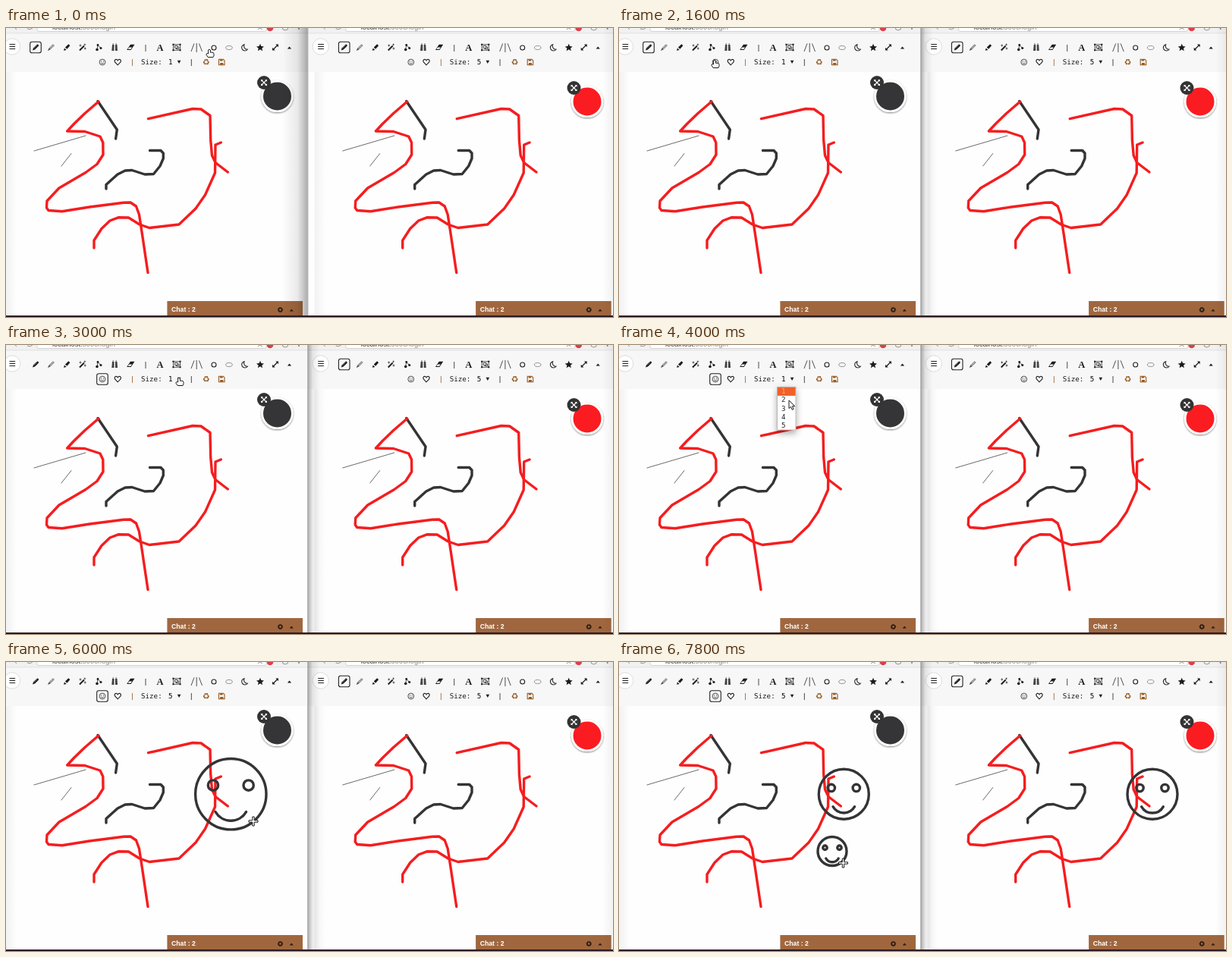
An HTML page that plays this animation: 800x381 px, repeating every 8 s.

```html
<!DOCTYPE html>
<html lang="en">
<head>
<meta charset="utf-8">
<title>Shared drawing board</title>
<style>
html, body { margin: 0; width: 100%; height: 100%; overflow: hidden; background: #fefefe; }
svg { display: block; width: 800px; height: 381px; }
.line { fill: none; stroke-width: 3.4; stroke-linecap: round; stroke-linejoin: round; }
.red { stroke: #f51d1f; }
.dark { stroke: #343436; }
.thin { stroke: #444; stroke-width: .8; }
.o { fill: none; stroke: #222; stroke-width: 1.1; }
.o.fine { stroke-width: .8; }
.o.gray { stroke: #888; stroke-width: .9; }
.o.rust { stroke: #95591d; }
.mono { font: 9.2px "DejaVu Sans Mono", monospace; }
.url { font: 9.4px "Liberation Sans", sans-serif; }
.chat { font: bold 8.7px "Liberation Sans", sans-serif; fill: #fff; }
.brown { fill: #95591d; }
.box { fill: none; stroke: #222; stroke-width: 1.1; }
.hide { display: none; }
</style>
</head>
<body>
<svg viewBox="0 0 800 381" xmlns="http://www.w3.org/2000/svg">
<defs>
  <clipPath id="clipL"><path d="M0 0H397.5V381H0Z"/></clipPath>
  <clipPath id="clipR"><path d="M397.5 0H800V381H397.5Z"/></clipPath>
  <linearGradient id="fade">
    <stop offset="0" stop-opacity="0"/>
    <stop offset=".6" stop-opacity=".08"/>
    <stop offset="1" stop-opacity=".32"/>
  </linearGradient>
  <linearGradient id="edge"><stop offset="0" stop-opacity=".05"/><stop offset="1" stop-opacity="0"/></linearGradient>
  <filter id="soft" x="-50%" y="-50%" width="200%" height="200%">
    <feDropShadow dx="0" dy="1" stdDeviation="1.3" flood-opacity=".5"/>
  </filter>
  <filter id="drop" x="-60%" y="-30%" width="220%" height="170%">
    <feDropShadow dx="0" dy="4" stdDeviation="4" flood-opacity=".35"/>
  </filter>

  <g id="expand">
    <path d="M-3 3L3-3" stroke="currentColor" stroke-width="1.2"/>
    <path d="M4-4V-.3L.3-4ZM-4 4V.3L-.3 4Z" fill="currentColor"/>
  </g>
  <path id="caret" d="M-2.6 1.4L0-1.5L2.6 1.4Z"/>

  <g id="window">
    <path d="M-10 0H410V381H-10Z" fill="#fefefe"/>
    <path d="M-10 7H410V58H-10Z" fill="#f7f7f8"/>
    <path d="M-10 0H410V7H-10Z" fill="#f1f1f1"/>
    <path d="M-10 6.8H410" stroke="#dedede" stroke-width=".8"/>
    <rect x="41" y="-14" width="302" height="18.5" rx="2" fill="#fff" stroke="#c9c9c9" stroke-width=".8"/>
    <text class="url" x="61" y="2.4" fill="#333">localhost:<tspan fill="#888">3000/login</tspan></text>
    <path d="M12 0L14 2M28 1Q32 3 35 0M332 2L335 0L338 2" class="o gray"/>
    <circle cx="348" cy="0" r="4.3" fill="#d9404a"/>
    <circle cx="368" cy="-1" r="4" class="o gray"/>
    <circle cx="386" cy="1" r="1" fill="#777"/>

    <circle cx="8" cy="24.5" r="10.7" fill="#fff" stroke="#d8d8d8" stroke-width=".9"/>
    <path d="M4.5 21.5H12.2M4.5 24.5H12.2M4.5 27.5H12.2" stroke="#222" stroke-width="1.2"/>

    <g fill="#1c1c1c">
      <g transform="translate(39 25.5)">
        <path d="M-3.9 3.9L-3.1 1L1.6-3.6Q2.6-4.4 3.6-3.4Q4.5-2.5 3.7-1.6L-1 3.1Z"/>
        <path d="M-2.4 1.5L2-2.8" stroke="#aaa" stroke-width=".6"/>
      </g>
      <g transform="translate(59.5 25.5)">
        <path d="M-4 4L-2.5 1L2.4-3.8L4-2.4L-1 2.5Z" fill="#aaa" stroke="#666" stroke-width=".7"/>
        <path d="M-4 4L-2.5 1L-1 2.5Z" fill="#444"/>
      </g>
      <g transform="translate(80 25.5)">
        <path d="M-4 4.2L-3 1L-.3 3.4ZM-2 0L2.4-4.2L4.4-2.2L.4 2.3Z"/>
      </g>
      <g transform="translate(101 25.5)">
        <path d="M-4 4L2-2" stroke="#1c1c1c" stroke-width="1.9"/>
        <path d="M-3-4V-1M-4.5-2.5H-1.5M3.2 0V3M1.8 1.5H4.7M2.8-4.8V-2.4M1.6-3.6H4.2" stroke="#1c1c1c" stroke-width=".7"/>
      </g>
      <g transform="translate(122 25.5)">
        <path d="M-2 3L-1-3L3 1" class="o fine"/>
        <circle cx="-2" cy="3" r="1.8"/><circle cx="-1" cy="-3" r="1.4"/><circle cx="3" cy="1" r="1.5"/>
      </g>
      <path d="M140 22H142.5V30H139.3ZM144 22H146.5L147 30H144ZM140.5 20.5H142V21.5H140.5ZM144.5 20.5H146V21.5H144.5Z" opacity=".82"/>
      <path d="M159.2 29L164 21.8H169.5L164.7 29Z"/>
      <path d="M160.7 28L162.3 25.5H166L164.3 28Z" fill="#fff"/>
      <text x="181.3" y="29" class="mono">|</text>
      <text x="203" y="30" text-anchor="middle" style="font:bold 12.5px 'Liberation Serif',serif">A</text>
      <g transform="translate(225 25.5)">
        <path d="M-4.5-3.7H4.5V3.7H-4.5ZM-2.5-2H1V1H-2.5ZM1-.5H2.8V2.2H-.5V1" class="o fine"/>
        <path d="M-5.6-4.8h2.1v2.1H-5.6ZM3.5-4.8h2.1v2.1H3.5ZM-5.6 2.7h2.1v2.1H-5.6ZM3.5 2.7h2.1v2.1H3.5Z"/>
      </g>
      <path d="M244 31L248 20.5M251.2 20V32M254.5 20.5L258.5 31" class="o fine"/>
      <circle cx="274" cy="26" r="3" class="o"/>
      <ellipse cx="294" cy="26" rx="4.3" ry="2.5" class="o gray"/>
      <path d="M314 21.7A4.2 4.2 0 1 0 318.3 28.2A4.5 4.5 0 0 1 314 21.7Z" class="o"/>
      <path d="M335 20.8L336.4 24.1L340 24.4L337.3 26.7L338.1 30.2L335 28.3L331.9 30.2L332.7 26.7L330 24.4L333.6 24.1Z"/>
      <use href="#expand" x="355" y="25.5" color="#1c1c1c"/>
      <use href="#caret" x="373.5" y="26"/>

      <g transform="translate(127 45)">
        <circle r="3.9" class="o fine"/>
        <path d="M-2 .9Q0 3.4 2 .9" class="o fine"/>
        <circle cx="-1.4" cy="-1.2" r=".6"/><circle cx="1.4" cy="-1.2" r=".6"/>
      </g>
      <path d="M147.3 48.8L143.6 45Q142.5 42.5 144.3 41.5Q146.2 40.8 147.3 42.8Q148.4 40.8 150.3 41.5Q152.1 42.5 151 45Z" class="o"/>
      <text x="163.8" y="48.4" class="mono brown">|</text>
      <text x="178" y="48.4" class="mono">Size:</text>
      <path d="M225.8 42.8H230.4L228.1 47Z"/>
      <text x="241.6" y="48.4" class="mono">|</text>
    </g>
    <text x="264" y="48.7" text-anchor="middle" class="brown" style="font:11px 'DejaVu Sans',sans-serif">♻</text>
    <path d="M280.5 41.3H286.4L288 42.9V48.7H280.5Z" class="o rust"/>
    <path d="M282 41.3H285.6V43.6H282ZM282.2 46H286.3V48.7H282.2Z" class="brown"/>

    <path d="M0 58H14V381H0Z" fill="url(#edge)"/>
    <path class="line thin" d="M37 162L105 142M73 182L86 165.5"/>
    <path class="line dark" d="M121 96.5L146.3 134L144.6 146M189.5 161.5H204L207.3 165V172L203 182L194.5 192.5L183 193L166 187.5L157 188L147 193L132 206.5V212"/>
    <path class="line red" d="M122 97L104 112.5L89.5 126.5L80.7 136L104 136.5L124 143L127.8 151L128 167L120 179.5L105 190.5L70 211L54 228L53.5 237L56 240.5L74 241.7L110 236L155 230.2L164 230L171.5 235L175.5 246L179.5 272L183.5 299L187 322.5"/>
    <path class="line red" d="M187.5 119.7L246 106.5L257 107L269 115.5L269.7 148L271.5 168L276 177.5L292.3 190"/>
    <path class="line red" d="M283.3 151L276 154L275.5 191L262.5 220L250 238L228 259L189 263.5L176 259L161.5 250L148 249.8L137 254L126 264.5L116 280V290"/>

    <path d="M212.4 360H391V379H212.4Z" fill="#a0673f"/>
    <text x="218" y="374.2" class="chat">Chat : 2</text>
    <circle cx="361.5" cy="371.5" r="2.2" fill="none" stroke="#2b1c12" stroke-width="1.6"/>
    <circle cx="361.5" cy="371.5" r="3.2" fill="none" stroke="#2b1c12" stroke-dasharray="1.25 1.25"/>
    <use href="#caret" x="376.3" y="372" fill="#2b1c12"/>
  </g>
  <g id="picker">
    <circle cx="357.5" cy="90" r="19.8" fill="currentColor" stroke="#fff" stroke-width="2.6" filter="url(#soft)"/>
    <circle cx="340" cy="72" r="9" fill="#333"/>
    <g transform="translate(340 72)" stroke="#fff" fill="#fff">
      <path d="M-3-3L3 3M3-3L-3 3" stroke-width="1.1"/>
      <path d="M-4-4H-1.2L-4-1.2ZM4-4H1.2L4-1.2ZM-4 4H-1.2L-4 1.2ZM4 4H1.2L4 1.2Z" stroke="none"/>
    </g>
  </g>
  <rect id="frame" x="-7.3" y="-7.3" width="14.6" height="14.6" rx="2.6" class="box"/>
</defs>

<g clip-path="url(#clipR)">
  <g transform="translate(406.7)">
    <use href="#window"/>
    <use href="#frame" x="39" y="25.5"/>
    <text x="214" y="48.4" class="mono">5</text>
    <use href="#picker" x="1.8" y="7" color="#fb1f20"/>
  </g>
  <path d="M0 0H14V381H0Z" fill="url(#edge)" transform="matrix(-1 0 0 1 800 0)"/>
  <g id="copy" class="hide line dark"></g>
  <path id="shadeR" d="M0 0H16V381H0Z" fill="url(#fade)" transform="matrix(-1 0 0 1 413.5 0)"/>
</g>

<g clip-path="url(#clipL)">
  <use href="#window"/>
  <use id="tool" href="#frame"/>
  <text id="size" x="214" y="48.4" class="mono">1</text>
  <use href="#picker" color="#363638"/>
  <path id="shadeL" d="M364 0H397.5V381H364Z" fill="url(#fade)"/>
</g>
<path d="M397.8 0V381" stroke="#999"/>
<path d="M0 379H800V381H0Z" fill="#2c1b25"/>

<g id="face1" class="line dark"></g>
<g id="face2" class="line dark"></g>

<g id="menu" filter="url(#drop)">
  <path d="M208.5 55.3H233V112H208.5Z" fill="#fff" stroke="#b0a8a0" stroke-width=".8"/>
  <rect id="pick" x="208.9" width="23.7" height="11.2" fill="#f0602c"/>
  <g id="items" class="mono"></g>
</g>

<g id="cursor" fill="#fff" stroke="#1a1a1a" stroke-linejoin="round">
  <path id="hand" d="M-1.4 6V1Q0-.8 1.4 1V4.2H4Q6 4.4 6 6.3V8.2L5 10.5H-1.8L-4 7.3Q-4.2 5.6-2.8 5.6Z"/>
  <path id="arrow" d="M0 0V10.6L2.5 8.4L4.3 12.4L6.2 11.5L4.4 7.7H7.8Z"/>
  <path id="cross" d="M-1.2-6H1.2V-1.2H6V1.2H1.2V6H-1.2V1.2H-6V-1.2H-1.2Z"/>
</g>
</svg>
<script>
const $ = id => document.getElementById(id);
const LOOP = 8000, STEP = 200;

// step: cursor kind, x, y
const moves = {
  0: ['hand', 268, 28], 1: ['hand', 288, 28], 2: ['hand', 314, 28],
  3: ['hand', 302, 32], 4: ['hand', 264, 36], 5: ['hand', 212, 38],
  6: ['hand', 165, 39], 7: ['hand', 138, 41], 8: ['hand', 126, 42],
  10: ['hand', 150, 42], 11: ['hand', 204, 42], 12: ['hand', 246, 42.5],
  13: ['hand', 240, 43], 14: ['hand', 233, 43], 15: ['hand', 228, 43],
  18: ['arrow', 228, 46], 19: ['arrow', 226, 58], 20: ['arrow', 224, 73],
  21: ['arrow', 221, 103], 23: ['cross', 222, 106], 24: ['cross', 237, 122],
  25: ['cross', 268, 150], 26: ['cross', 291, 169], 27: ['cross', 296.5, 173],
  28: ['cross', 312, 194], 29: ['cross', 321, 204], 30: ['cross', 326, 210],
  32: ['cross', 321, 205], 33: ['cross', 316, 200], 35: ['cross', 307, 218],
  36: ['cross', 290, 243], 37: ['cross', 281, 249], 38: ['cross', 289, 257],
  39: ['cross', 295.5, 265]
};
// step: radius
const radius1 = { 0: 0, 28: 25.5, 29: 39, 30: 46.7, 32: 40, 33: 33 };
const radius2 = { 0: 0, 38: 11, 39: 19 };

function at(table, step) {
  while (!(step in table)) step--;
  return table[step];
}

function face(x, y, r) {
  if (!r) return '';
  const ring = (dx, dy, q) => `<circle cx="${x + dx}" cy="${y + dy}" r="${q}"/>`;
  const mx = r / 2 * Math.cos(Math.PI / 6), my = y + r / 2;
  return ring(0, 0, r) + ring(-r / 2, -r / 4, r / 7) + ring(r / 2, -r / 4, r / 7) +
    `<path d="M${x - mx} ${my}A${r / 2} ${r / 2} 0 0 0 ${x + mx} ${my}"/>`;
}

const show = (id, on) => $(id).classList.toggle('hide', !on);

$('copy').innerHTML = face(703, 174.3, 33);
$('items').innerHTML = [1, 2, 3, 4, 5]
  .map((n, i) => `<text x="214" y="${64.2 + i * 11.2}">${n}</text>`).join('');

function draw(step) {
  const [kind, x, y] = at(moves, step);
  $('cursor').setAttribute('transform', `translate(${x} ${y})`);
  for (const id of ['hand', 'arrow', 'cross']) show(id, id === kind);

  $('tool').setAttribute('transform', step < 9 ? 'translate(39 25.5)' : 'translate(127 45)');
  show('shadeL', step < 7);
  show('shadeR', step >= 7);

  show('menu', step >= 18 && step < 23);
  const row = step < 21 ? 0 : 4;
  $('pick').setAttribute('y', 55.7 + row * 11.2);
  [...$('items').children].forEach((t, i) => t.setAttribute('fill', i === row ? '#ffb25e' : '#222'));
  $('size').textContent = step < 23 ? 1 : 5;

  $('face1').innerHTML = face(296.3, 174.2, at(radius1, step));
  $('face2').innerHTML = face(281, 249.5, at(radius2, step));
  show('copy', step >= 35);
}

const start = performance.now();
let last = -1;
function tick() {
  const step = Math.floor((performance.now() - start) % LOOP / STEP);
  if (step !== last) draw(last = step);
  requestAnimationFrame(tick);
}
tick();
</script>
</body>
</html>
```
